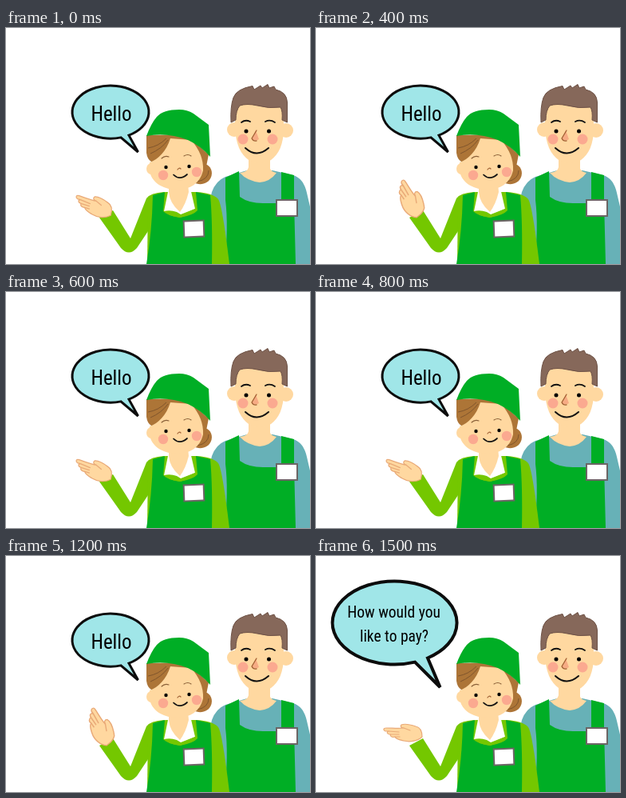
Recreate the animation shown at these times as an HTML page. Size 381 by 295 pixels, loop 6500 ms.

```html
<!DOCTYPE html>
<html lang="en">
<head>
<meta charset="utf-8">
<title>Friendly shop staff</title>
<style>
  html, body { margin: 0; width: 100%; height: 100%; overflow: hidden; background: #fff; }
  svg { display: block; width: 381px; height: 295px; }
  text { font-family: "Liberation Sans Narrow", "Roboto Condensed", "Open Sans", "Noto Sans", sans-serif; font-stretch: 62.5%; text-anchor: middle; }
  .line { fill: none; stroke: #111; stroke-linecap: round; stroke-linejoin: round; }
  .skin { fill: #ffd8a0; }
  .green { fill: #00ae25; }
  .lime { fill: #74c700; }
  .blue { fill: #67b1b7; }
  .cheek { fill: #fba990; }
  .bubble { fill: #a0e6e8; stroke: #0c0c0c; stroke-linejoin: miter; }
  .badge { fill: #fff; stroke: #6c6565; stroke-width: 2; }
  .man-hair { fill: #86685a; stroke: #6d5145; stroke-width: 1; }
  .hair { fill: #ad7537; }
  .strand { fill: none; stroke: #80552c; stroke-width: 1; }
</style>
</head>
<body>
<svg viewBox="0 0 381 295">
  <g id="man">
    <path class="blue" d="M254 295V222L258 205Q263 191 275 186L302 178H334L360 184Q373 188 377 206L383 232V295Z"/>
    <path class="skin" d="M304 162H331V176Q333 180 339 181Q331 192 318 193Q302 191 293 181Q303 180 304 174Z"/>
    <path class="green" d="M275 187L292 179L293 211Q304 219 322 219H345V180L361 184V216L363 295H274Q279 248 275 215Z"/>
    <circle class="skin" cx="286" cy="127" r="9"/>
    <circle class="skin" cx="351" cy="128" r="9"/>
    <path class="skin" d="M287 95H348V125C348 145 342 158 332 165Q318 173 304 165C294 158 288 145 287 125Z"/>
    <path class="man-hair" d="M282 118Q281 98 285 87Q289 76 309 72.500L311 77L319 72L321 75L328 70.500L330 75L336 73L338 77Q352 80 352.500 93V118L346 115Q347 104 344 99Q329 101 315 97Q302 94 293 97Q288 103 288 115Z"/>
    <circle class="cheek" cx="297" cy="139" r="6.5"/>
    <circle class="cheek" cx="334" cy="139" r="6.5"/>
    <path d="M313 128L308 139Q312 142 317 139Z" fill="#f6ab84"/>
    <path class="line" d="M314 128L308 138Q310 142 314 141" style="stroke:#a06034" stroke-width="1.3"/>
    <path class="line" d="M295 118Q300 114 306 117M325 117Q331 114 337 118" stroke-width="1.8"/>
    <circle cx="301" cy="129" r="2.5"/>
    <circle cx="329.500" cy="129" r="2.5"/>
    <path class="line" d="M300 150Q314 163 329 150" stroke-width="2"/>
    <rect class="badge" x="339" y="215" width="26" height="20"/>
  </g>

  <g id="arm">
    <path class="lime" d="M198 205Q181 206 176 213L156 263L134 228L117 237L144 275Q154 286 164 275L184 245Z"/>
    <g id="hand">
      <g transform="translate(-129 -224)" stroke="#e9aa78" stroke-width="1.2" stroke-linejoin="round" stroke-linecap="round">
        <path class="skin" d="M133 226C133 218 130 214 125 213C119 211 112 209 107 211C105 213 107 215 110 215C104 216 95 215 88 215C84 215 84 218 87 219L91 219C88 220 89 223 93 223C93 226 96 227 99 226C100 229 106 230 110 231C118 233 128 231 133 226Z"/>
        <path fill="none" d="M91 219L104 220M93 223L104 223M99 226L105 226M110 215L118 218"/>
      </g>
    </g>
  </g>

  <g id="woman">
    <path class="lime" d="M178 211L200 205H238Q259 206 266 214Q271 221 280 295H177Z"/>
    <path class="green" d="M184 209L199 205L197 229Q201 234 218 237Q235 234 240 228L238 205L256 209Q259 242 258 295H176Q183 255 184 209Z"/>
    <path fill="#fff" d="M204 200L198 229L210 230L219 234L237 226L231 200Z"/>
    <path class="lime" d="M198 229Q206 227 214 230L219 233L237 226Q236 232 218 237Q201 234 198 229Z"/>
    <path class="skin" d="M204 195H228L229 205Q225 221 218 230Q205 219 204 205Z"/>
    <path class="hair" d="M242 172C251 166 260 175 257.500 185C254 196 242 197 235 193Z"/>
    <path class="strand" d="M254 178Q254 189 240 192"/>
    <path class="hair" d="M176 134L176 156Q177 164 182 167L250 178L254 158L225 133Z"/>
    <path class="skin" d="M180 168C191 164 201 154 206 138L232 140Q248 158 247 178C243 195 230 202 214 202C195 202 181 191 180 178Z"/>
    <ellipse class="skin" cx="182" cy="176" rx="6" ry="7"/>
    <path class="strand" d="M178 150Q191 148 201 138M181 157Q195 151 203 140"/>
    <path class="green" d="M176 135Q182 119 189 111Q197 102 217 102Q227 102 235 107L254 121L256 161Q245 148 228 140Q202 130 176 135Z"/>
    <circle class="cheek" cx="197" cy="184" r="6.2"/>
    <circle class="cheek" cx="239" cy="180" r="6.2"/>
    <path class="line" d="M195 163Q199 159 204 161M223 160Q228 157 232 160" style="stroke:#8a6038" stroke-width="1.1"/>
    <circle cx="200.500" cy="174" r="2.2"/>
    <circle cx="229.500" cy="173" r="2.2"/>
    <path class="line" d="M215 177Q217 174 219 176" style="stroke:#a06034" stroke-width="1.2"/>
    <path class="line" d="M210 183.500Q218 191 227 183" stroke-width="1.7"/>
    <rect class="badge" x="223" y="241" width="25" height="20" transform="rotate(-2 235 251)"/>
  </g>

  <g id="hello">
    <path class="bubble" stroke-width="3" d="M144 136.900A48 33 0 1 1 154 134.100L165.500 155Z"/>
    <text x="132" y="116" font-size="25">Hello</text>
  </g>
  <g id="question">
    <path class="bubble" stroke-width="4" d="M124 132.600A78 52 0 1 1 140 127.500L155.500 164Z"/>
    <text x="97.500" y="77" font-size="19.5">How would you</text>
    <text x="98" y="107" font-size="19.5">like to pay?</text>
  </g>
</svg>
<script>
  const LOOP = 6500, STEP = 100, WAVE_END = 1500;
  // wrist x, wrist y, turn: from flat palm to upright
  const poses = [[129, 224, 0], [128, 231, 17], [127, 232, 36], [126, 232, 55], [128, 234, 74]];
  const get = id => document.getElementById(id);
  const hand = get('hand'), hello = get('hello'), question = get('question');

  function draw(now) {
    const t = now % LOOP;
    const waving = t < WAVE_END;
    const step = Math.floor(t / STEP);
    const level = waving ? 4 - Math.abs(step % 8 - 3) : 0;
    const [x, y, turn] = poses[level];
    const spread = 1 + level * 0.09; // the palm opens as it rises
    hand.setAttribute('transform', `translate(${x} ${y}) rotate(${turn}) scale(1 ${spread})`);
    hello.style.display = waving ? '' : 'none';
    question.style.display = waving ? 'none' : '';
  }

  const start = performance.now();
  function tick() {
    draw(performance.now() - start);
    requestAnimationFrame(tick);
  }
  tick();
</script>
</body>
</html>
```
